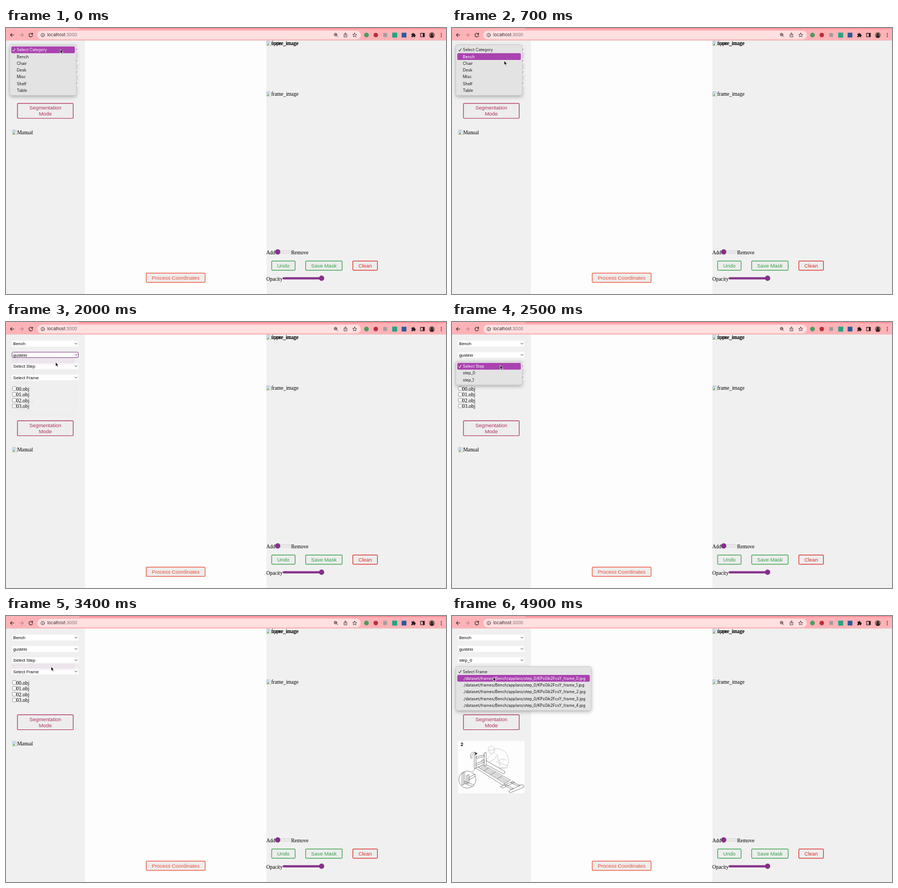
Write an HTML page that moves like this. It is 800x483 px and loops after 5 s.

```html
<!DOCTYPE html>
<html lang="en">
<head>
<meta charset="utf-8">
<title>Annotation tool</title>
<style>
  html, body { margin: 0; width: 100%; height: 100%; overflow: hidden; background: #f0f0f0; }
  svg { display: block; width: 100vw; height: 100vh; }
  text { white-space: pre; }
  .serif { font: 9.4px "Liberation Serif", Times, serif; }
  .btn { font: 9.4px "Liberation Sans", Arial, sans-serif; text-anchor: middle; }
  .sel { font: 7.83px "Liberation Sans", Arial, sans-serif; }
  .menu { font: 7.2px Inter, sans-serif; fill: #161616; }
  .url { font: 7.7px Inter, sans-serif; fill: #33292b; }
  .line { fill: none; stroke: #3a2a2d; stroke-width: 1.1; stroke-linecap: round; stroke-linejoin: round; }
  .wood { fill: #fff; stroke: #444; stroke-width: .6; stroke-linejoin: round; }
  .thin { fill: none; stroke: #555; stroke-width: .6; }
  .person { fill: none; stroke: #bbb; stroke-width: .7; stroke-linejoin: round; }
</style>
</head>
<body>
<svg viewBox="0 0 800 483" preserveAspectRatio="none">
  <defs>
    <filter id="shadow" x="-20%" y="-20%" width="140%" height="150%">
      <feDropShadow dx="0" dy="2.5" stdDeviation="3" flood-color="#000" flood-opacity=".28"/>
    </filter>
    <g id="broken">
      <path d="M.8 .8H6.4L8.6 3V8.8H.8Z" fill="#fff" stroke="#9a9a9a" stroke-width=".7"/>
      <path d="M1.2 1.2H6V3.4H8.2V5L1.2 6Z" fill="#c3d6f5"/>
      <path d="M1.2 8.4L3.6 5L5.4 6.8L8.2 4.4L4.6 8.4Z" fill="#54a648"/>
      <path d="M3 9L9 3.6V5.4L5.2 9Z" fill="#f0f0f0"/>
    </g>
  </defs>

  <rect width="800" height="483" fill="#f0f0f0"/>
  <rect x="143.5" y="22" width="330" height="461" fill="#fdfdfd"/>

  <g id="toolbar">
    <rect width="800" height="22.5" fill="#ffb3b7"/>
    <path d="M132 0H800V2.2H136Q133 2.2 132 0Z" fill="#fa929b"/>
    <rect y="22" width="800" height=".8" fill="#e9c3c5"/>
    <rect x="57" y="5" width="588" height="15.4" rx="7.7" fill="#ffe0e1"/>
    <path class="line" d="M14.3 12.7H8M10.8 9.8L7.9 12.7L10.8 15.6"/>
    <path class="line" d="M25 12.7H31.3M28.5 9.8L31.4 12.7L28.5 15.6" style="stroke:#b48387"/>
    <path class="line" d="M47.6 10.6A3.3 3.3 0 1 0 48.4 13.2M48.4 9.2V11.5H46"/>
    <circle class="line" cx="66.8" cy="12.8" r="3.2" style="stroke-width:.8"/>
    <path class="line" d="M66.8 12.6V14.5M66.8 11.1V11.2" style="stroke-width:.8"/>
    <text class="url" x="75" y="15.4">localhost<tspan fill="#7d6669">:3000</tspan></text>
    <circle class="line" cx="599.2" cy="12" r="2.5" style="stroke-width:.9"/>
    <path class="line" d="M601.2 14L603.3 16.1M598 12H600.4M599.2 10.8V13.2" style="stroke-width:.8"/>
    <path class="line" d="M615.8 11.6H614.6V16.2H619.8V11.6H618.6M617.2 14V9M615.6 10.4L617.2 8.8L618.8 10.4" style="stroke-width:.8"/>
    <path class="line" d="M634 9.1L635.1 11.6L637.7 11.8L635.7 13.5L636.3 16.1L634 14.7L631.7 16.1L632.3 13.5L630.3 11.8L632.9 11.6Z" style="stroke-width:.8"/>
    <circle cx="655.4" cy="12.8" r="4.3" fill="#4b9d5f"/>
    <circle cx="672.3" cy="12.8" r="4" fill="#b92f3a"/>
    <rect x="685.8" y="9.2" width="7" height="7" fill="#a69a9c"/>
    <rect x="702.2" y="8.4" width="9" height="9" fill="#24a583"/>
    <rect x="719.4" y="8.6" width="8.6" height="8.6" fill="#2b5a9b"/>
    <path d="M737 10.4H739.1A1.3 1.3 0 1 1 741.7 10.4H743.6V12.4A1.3 1.3 0 1 1 743.6 15V16.7H741.6A1.2 1.2 0 0 0 739.2 16.7H737V14.6A1.2 1.2 0 0 0 737 12.2Z" fill="#281c1f"/>
    <path d="M753.8 9.6H760.8V16H753.8Z" fill="none" stroke="#281c1f" stroke-width="1.1"/>
    <path d="M757.8 9.6H761V16H757.8Z" fill="#281c1f"/>
    <circle cx="774.3" cy="12.8" r="5.3" fill="#8b6b5d"/>
    <path d="M770.7 16.7Q771 13.8 772.6 13.3Q771.5 9.2 774.3 9.2T776 13.3Q777.6 13.8 777.9 16.7Q774.3 19.4 770.7 16.7Z" fill="#35272a"/>
    <g fill="#3a2a2d"><circle cx="791.4" cy="9.9" r=".9"/><circle cx="791.4" cy="12.8" r=".9"/><circle cx="791.4" cy="15.7" r=".9"/></g>
  </g>

  <g class="serif">
    <use href="#broken" x="473.2" y="23"/>
    <text x="482.4" y="31">frame_image</text>
    <text x="482.4" y="31">upper_image</text>
    <use href="#broken" x="473.2" y="115"/>
    <text x="482.4" y="123">frame_image</text>
    <text x="473.2" y="411.2">Add</text>
    <text x="518.6" y="411.2">Remove</text>
    <text x="473.2" y="459">Opacity</text>
  </g>
  <rect x="490" y="404.7" width="28.6" height="4" rx="2" fill="#efefef" stroke="#b5b5b5" stroke-width=".6"/>
  <circle cx="494" cy="406.6" r="4.8" fill="#85308a"/>
  <rect x="503" y="452.4" width="74" height="4.2" rx="2.1" fill="#85308a"/>
  <circle cx="573.8" cy="454.4" r="4.8" fill="#85308a"/>

  <g id="buttons"></g>
  <g id="selects"></g>

  <g id="list" class="serif" data-on="2000 5000"></g>

  <g id="lower">
    <g id="mode"></g>
    <g class="serif" data-on="0 3600">
      <use href="#broken" x="11.2" y="184.6"/>
      <text x="20.4" y="192.6">Manual</text>
    </g>
  </g>

  <g id="manual" data-on="3600 5000">
    <rect x="11" y="227" width="121" height="95" fill="#fdfdfd"/>
    <text x="15.6" y="236.4" style="font:bold 8px Inter,sans-serif">2</text>
    <path class="person" d="M66 243Q65 237 71 236.5Q77 237 77.5 243L66 243.6L64.5 245M67 244Q67 249 71 250L76 248L77.5 243M76 241Q92 239 100 251Q105 262 101 272L96 276H82L88 270L80 264M72 250Q66 258 62 261L66 266L78 259L82 251M83 252Q82 263 88 267L101 272M88 270L85 263Q90 257 99 262M78 276H102"/>
    <path class="wood" d="M46 275L56 270L106 298L94 305Z"/>
    <path class="thin" d="M49 274L98 302.5M51.5 272.5L100.5 301M54 271.2L103 299.8M58 281.5L66 276M70 288.5L79 283M82 296L91 290.5"/>
    <path class="wood" d="M43 276L46 274L95 303.5V307L92 307Z"/>
    <path class="wood" d="M54 262L57 260L96 282V285.5L93 286.5L54 265.5Z"/>
    <path class="wood" d="M40.5 252L43.5 250.5V276L40.5 277.5ZM58.5 249L62 247.5V271L58.5 272.5ZM43.5 256L58.5 252V255L43.5 259ZM43.5 268L58.5 262V265L43.5 271.5Z"/>
    <path class="wood" d="M88 310L111 300L114 302L92 312.5ZM104 317L127 306L130.5 308V311L107 320.5L104 320ZM96 308L99 306.5L112 313.5L108.5 315ZM107 303L110 301.5L124 307.5L121 309Z"/>
    <path d="M34.5 259Q31.5 248 39 247.5L43 248.5" class="thin"/>
    <path d="M36.5 259Q35 251 40 250L42 250" class="thin"/>
    <path d="M40 246.5L46.5 249.5L41.5 252.5L42.5 249.5Z" fill="#222"/>
    <path class="thin" d="M37 283L43 276"/>
    <circle class="wood" cx="27.8" cy="297" r="15.6"/>
    <path class="wood" d="M18 286L23 283.5V305L18 307ZM26 290L31 287.5V303L26 305ZM31 293L42 287V291L31 298ZM23 300L40 307L38 310L23 304Z"/>
    <path class="thin" d="M20.5 285V306M28.5 289V304"/>
  </g>

  <g id="menus"></g>
  <path id="cursor" d="M0 0V7.6L1.8 6L3 8.8L4.4 8.2L3.2 5.5H5.6Z" fill="#111" stroke="#fff" stroke-width=".7" stroke-linejoin="round"/>
</svg>

<script>
const LOOP = 5000, TICK = 100, ROW = 12.25;
const $ = id => document.getElementById(id);
const clamp = v => Math.max(0, Math.min(1, v));

function button(x, y, w, h, color, lines) {
  const first = y + h / 2 + 3.3 - (lines.length - 1) * 5.3;
  const label = (s, i) => `<text class="btn" x="${x + w / 2}" y="${first + i * 10.6}" fill="${color}">${s}</text>`;
  return `<rect x="${x}" y="${y}" width="${w}" height="${h}" rx="1.2" fill="#ededed" stroke="${color}" stroke-width="1.2"/>` +
    lines.map(label).join("");
}
$("buttons").innerHTML =
  button(255, 445.2, 107, 16.6, "#ee5138", ["Process Coordinates"]) +
  button(483, 423.2, 42.6, 16.6, "#35a24a", ["Undo"]) +
  button(544.8, 423.2, 66.4, 16.6, "#35a24a", ["Save Mask"]) +
  button(630.6, 423.2, 44.8, 16.6, "#dc2f2a", ["Clean"]);
$("mode").innerHTML = button(20.8, 136.8, 101.4, 27.2, "#b03362", ["Segmentation", "Mode"]);

// label before, label after, time of choice, end of focus ring
const fields = [
  ["Select Category", "Bench", 900, 1250],
  ["Select Sub Category", "gustelo", 2000, 2400],
  ["Select Step", "step_0", 3500, 4600],
  ["Select Frame", "", LOOP, LOOP]
];
$("selects").innerHTML = fields.map(([before, after, at, blur], i) => {
  const y = 39.2 + i * 20.5;
  return `<rect x="10.6" y="${y - 5.2}" width="121" height="10.4" rx="1.5" fill="#fff"/>
    <rect data-on="${at} ${blur}" x="11" y="${y - 4.9}" width="120.4" height="9.8" rx="1.5" fill="none" stroke="#7d3c80" stroke-width="1"/>
    <text class="sel" data-on="0 ${at}" x="13" y="${y + 2.8}">${before}</text>
    <text class="sel" data-on="${at} ${LOOP}" x="13" y="${y + 2.8}">${after}</text>
    <path d="M125 ${y - 1.2}L127.3 ${y + 1.2}L129.6 ${y - 1.2}" fill="none" stroke="#333" stroke-width=".9"/>`;
}).join("");

$("list").innerHTML = [0, 1, 2, 3].map(i => {
  const y = 117.3 + i * 10.6;
  return `<rect x="11.5" y="${y}" width="6.8" height="6.8" rx="1.3" fill="#fff" stroke="#767676" stroke-width=".7"/>
    <text x="18.6" y="${y + 7.2}">0${i}.obj</text>`;
}).join("");

const frames = [0, 1, 2, 3, 4].map(i => `./dataset/frames/Bench/applaro/step_0/KPs0ik2FcsY_frame_${i}.jpg`);
const menus = [
  { top: 33.6, w: 121, from: 0, move: 300, to: 910,
    rows: ["Select Category", "Bench", "Chair", "Desk", "Misc", "Shelf", "Table"] },
  { top: 53.8, w: 121, from: 1250, move: 1500, to: 2010,
    rows: ["Select Sub Category", "gustelo", "gustelo_2", "gustelo_3", "korvel", "korvel_2", "tandrilo", "brogvind", "flomek"] },
  { top: 74.3, w: 121, from: 2400, move: 3000, to: 3410,
    rows: ["Select Step", "step_0", "step_1"] },
  { top: 94.8, w: 246.4, from: 4600, move: 4800, to: 9000,
    rows: ["Select Frame", ...frames] }
];
$("menus").innerHTML = menus.map(m => {
  const row = (s, i) => `<text x="19.8" y="${m.top + i * ROW + 8.7}">${s}</text>`;
  return `<g class="menu">
    <rect x="6.8" y="${m.top - 3.1}" width="${m.w}" height="${m.rows.length * ROW + 6.2}" rx="3.6" fill="#e4e3e4" stroke="#b9b9b9" stroke-width=".6" filter="url(#shadow)"/>
    <rect class="bar" x="9.6" width="${m.w - 5.4}" height="${ROW}" rx="2.2" fill="#aa42b0"/>
    <path class="tick" d="M12.2 ${m.top + 6.6}L13.8 ${m.top + 8.6}L16.8 ${m.top + 3.8}" fill="none" stroke-width="1"/>
    ${m.rows.map(row).join("")}</g>`;
}).join("");
menus.forEach((m, i) => {
  m.el = $("menus").children[i];
  m.bar = m.el.querySelector(".bar");
  m.tick = m.el.querySelector(".tick");
  m.text = m.el.querySelectorAll("text");
});

const path = [
  [0, 98.7, 38.6], [700, 94.8, 59.6], [1300, 93.6, 65], [2500, 87.6, 78.6],
  [3400, 82, 92], [4400, 75.6, 100.4], [4900, 75, 110.8], [5000, 75, 111]
];
function pointer(t) {
  const i = path.findIndex(p => p[0] > t);
  const [a, b] = [path[i - 1], path[i]];
  const k = (t - a[0]) / (b[0] - a[0]);
  return [a[1] + (b[1] - a[1]) * k, a[2] + (b[2] - a[2]) * k];
}

const timed = [...document.querySelectorAll("[data-on]")].map(el => [el, ...el.dataset.on.split(" ").map(Number)]);

function draw(t) {
  for (const [el, from, to] of timed) el.style.display = t >= from && t < to ? "" : "none";
  for (const m of menus) {
    const open = t >= m.from && t < m.to;
    m.el.style.display = open ? "" : "none";
    if (!open) continue;
    const pick = t < m.move ? 0 : 1;
    m.el.style.opacity = clamp((m.to - t) / 200);
    m.bar.setAttribute("y", m.top + pick * ROW);
    m.tick.setAttribute("stroke", pick ? "#161616" : "#fff");
    m.text.forEach((el, i) => { el.style.fill = i === pick ? "#fff" : ""; });
  }
  $("lower").setAttribute("transform", `translate(0 ${t < 2000 ? 0 : 42.5})`);
  $("cursor").setAttribute("transform", `translate(${pointer(t)})`);
}

let start;
function loop(now) {
  start ??= now;
  draw(Math.floor(((now - start) % LOOP) / TICK) * TICK);
  requestAnimationFrame(loop);
}
draw(0);
requestAnimationFrame(loop);
</script>
</body>
</html>
```
